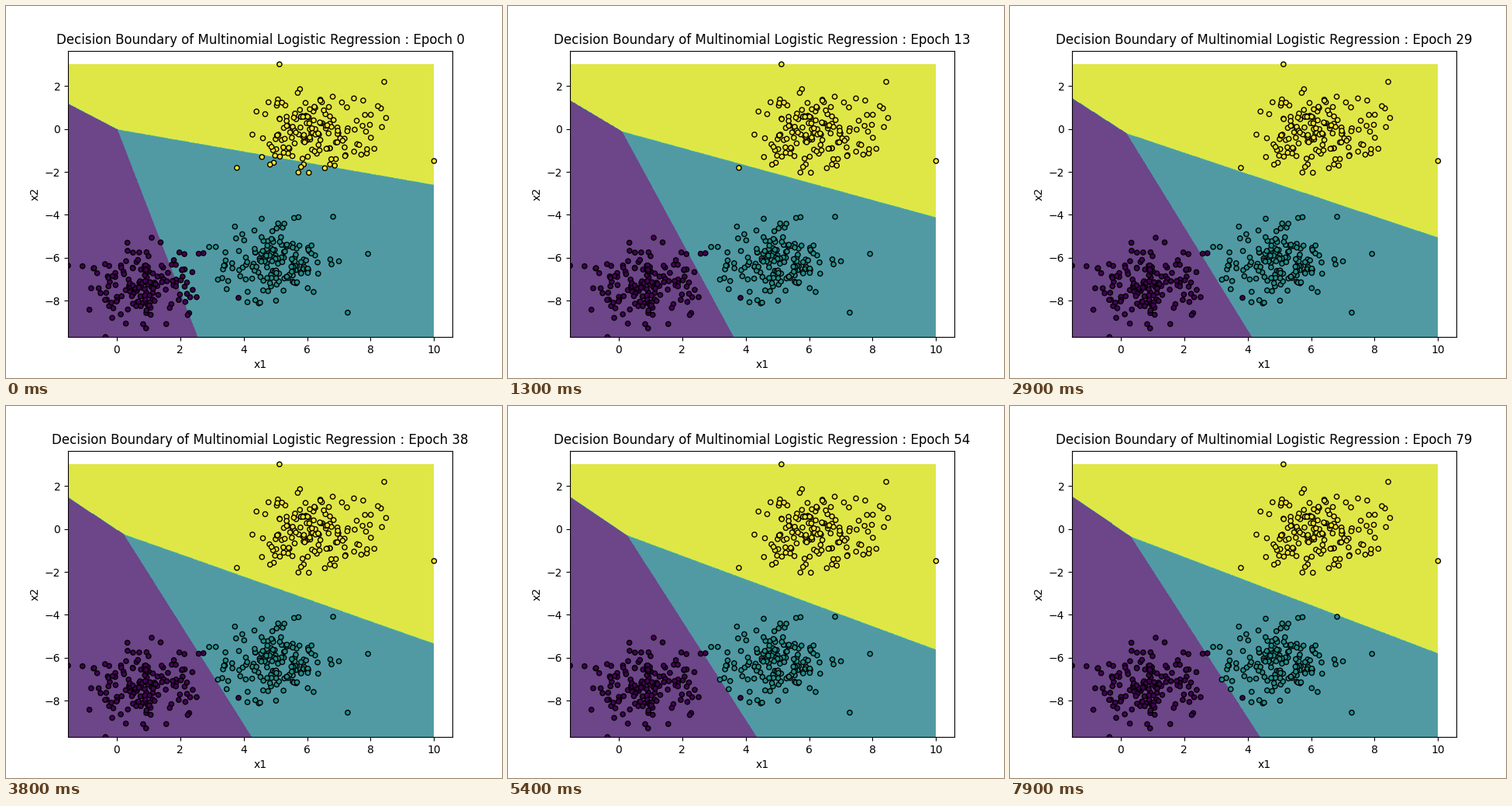
Animation of 640x480 px, one loop 8000 ms. Source, as a matplotlib script:

```python
import numpy as np
import matplotlib.pyplot as plt
from matplotlib.animation import FuncAnimation
from matplotlib.colors import ListedColormap

EPOCHS = 80
PER_CLASS = 166
X0, X1, Y0, Y1 = -1.53, 10.0, -9.70, 3.02
STEP = 0.02
rng = np.random.default_rng(7)


def cluster(center, spread, strays):
    """Seeded normal cloud without far tails, plus a few isolated points."""
    z = rng.normal(size=(2 * PER_CLASS, 2))
    cloud = np.array(center) + z * spread
    keep = (np.hypot(*z.T) < 2.4) & (cloud[:, 0] > X0) & (cloud[:, 1] > Y0)
    return np.vstack([cloud[keep][:PER_CLASS - len(strays)], strays])


def settle(t, start, end, tau):
    return end + (start - end) * np.exp(-t / tau)


gx, gy = np.meshgrid(np.arange(X0, X1, STEP), np.arange(Y0, Y1, STEP))


def classify(t):
    """Class 0, 1 or 2 on the grid: three rays leave one moving corner."""
    cx = settle(t, 0.03, 0.42, 54)
    cy = settle(t, -0.03, -0.47, 54)
    left = settle(t, 1.17, 1.53, 23)
    right = settle(t, -2.61, -5.87, 20.8)
    bottom = settle(t, 2.56, 4.41, 15)
    roof = np.interp(gx[0], [X0, cx, X1], [left, cy, right])
    wall = cx + (bottom - cx) * (gy - cy) / (Y0 - cy)
    return np.where(gy > roof, 2.0, np.where(gx < wall, 0.0, 1.0))


groups = [
    cluster((0.95, -7.2), (0.95, 0.95), [(X0, -6.37), (-0.35, Y0), (3.84, -7.87)]),
    cluster((4.95, -6.1), (0.9, 0.95), [(7.92, -5.82), (7.28, -8.56), (6.82, -4.09)]),
    cluster((6.3, -0.1), (1.0, 0.9), [(5.13, Y1), (X1, -1.49), (3.79, -1.81), (8.43, 2.2)]),
]
points = np.vstack(groups)
labels = np.repeat([0, 1, 2], PER_CLASS)
order = rng.permutation(len(points))

fig, ax = plt.subplots(figsize=(6.4, 4.8), dpi=100)
bands = ListedColormap(plt.get_cmap("viridis")((np.arange(8) + 0.5) / 8))
half = STEP / 2
regions = ax.imshow(classify(0), origin="lower", aspect="auto",
                    extent=(X0 - half, X1 - half, Y0 - half, Y1 - half),
                    interpolation="bilinear", cmap=bands,
                    vmin=0.01, vmax=2.01, alpha=0.8)
ax.scatter(*points[order].T, c=labels[order], s=20, edgecolor="k", cmap="viridis")
ax.set_xlim(X0, X1 + 0.05 * (X1 - X0))
ax.set_ylim(Y0, Y1 + 0.05 * (Y1 - Y0))
ax.set_xlabel("x1")
ax.set_ylabel("x2")
title = ax.set_title("")


def update(epoch):
    regions.set_data(classify(epoch))
    title.set_text(f"Decision Boundary of Multinomial Logistic Regression : Epoch {epoch}")
    return regions, title


anim = FuncAnimation(fig, update, frames=EPOCHS, interval=100, repeat=True, repeat_delay=0)
plt.show()
```
